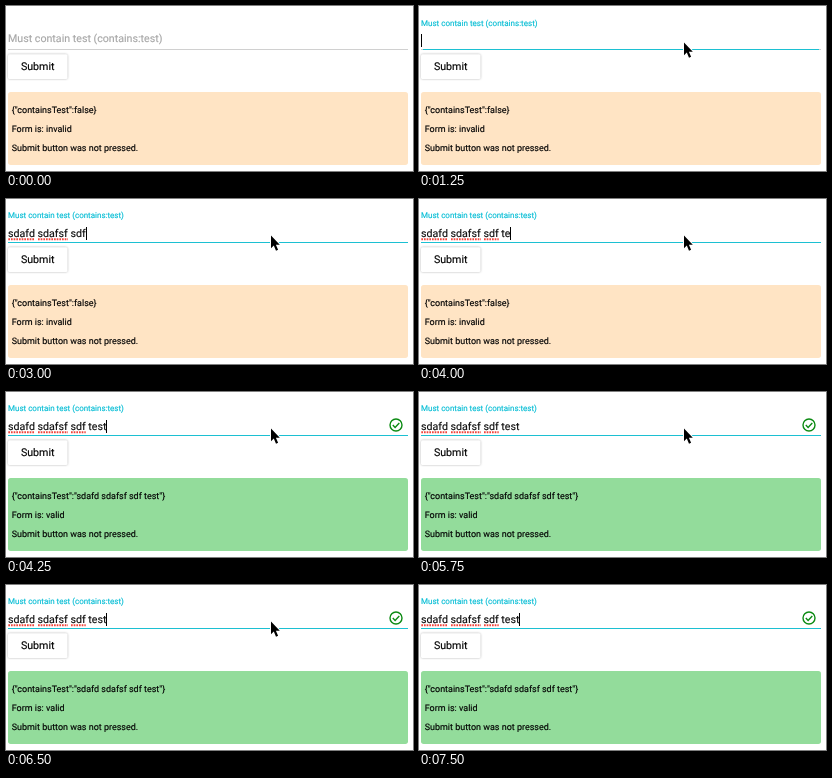
Recreate the animation shown at these times as an HTML page. Size 407 by 165 pixels, loop 7.75 s.

```html
<!DOCTYPE html>
<html lang="en">
<head>
<meta charset="utf-8">
<title>Form validation</title>
<style>
  html, body { margin: 0; width: 100%; height: 100%; overflow: hidden; background: #fff; }
  svg { display: block; width: 407px; height: 165px; font: 10.667px Roboto, sans-serif; }
  text { text-rendering: geometricPrecision; stroke: #000; stroke-width: .15; }
  .output { font-size: 8.98px; }
  .typos { stroke: #f0443c; stroke-width: 1.9; stroke-dasharray: 1.7 .97; }
  .button { fill: #fff; filter: drop-shadow(0 .7px .8px rgba(0, 0, 0, .3)); }
  .valid { fill: none; stroke: #0b8a12; stroke-width: 1.4; }
</style>
</head>
<body>
<svg viewBox="0 0 407 165">
  <rect x="2" y="43" width="400" height="1" fill="#d0d0d0"/>
  <rect id="bar" y="43" height="1" fill="#1cc0d2"/>
  <text id="label" x="2">Must contain test (contains:test)</text>
  <text id="typed" x="2" y="38" fill="#111"></text>
  <g class="typos">
    <path id="typo1" d="M2.3 40.2H29"/>
    <path id="typo2" d="M32 40.2H62"/>
    <path id="typo3" d="M65 40.2H79.7"/>
  </g>
  <rect id="caret" y="28" width="1" height="13"/>
  <g id="check" class="valid">
    <circle cx="390" cy="33" r="6"/>
    <path d="M386.8 33.1l2.3 2.3 4.2-4.4"/>
  </g>

  <rect class="button" x="2" y="48.3" width="59.5" height="24.7" rx="1.5"/>
  <text x="14.9" y="64">Submit</text>

  <rect id="panel" x="2" y="86" width="400" height="73" rx="2.7"/>
  <g class="output">
    <text id="json" x="5.7" y="107"></text>
    <text id="status" x="5.7" y="126"></text>
    <text x="5.7" y="145">Submit button was not pressed.</text>
  </g>

  <path id="pointer" d="M0 0V12.8L2.8 10.1 5 15.3 7.1 14.4 4.9 9.4H8.8Z"
        stroke="#fff" stroke-width="2" paint-order="stroke"/>
</svg>
<script>
  const LOOP = 7750;
  const $ = id => document.getElementById(id);
  const set = (id, attrs) => {
    for (const key in attrs) $(id).setAttribute(key, attrs[key]);
  };
  const show = (id, on) => set(id, { visibility: on ? 'visible' : 'hidden' });
  const mix = (a, b, p) => a + (b - a) * p;

  const FULL = 'sdafd sdafsf sdf test';
  const REST = [166, 166, 166];
  const ACTIVE = [0, 188, 212];

  // Each step: start time and the values that change there.
  const steps = [
    [0, { float: 0, bar: 0, chars: 0, caret: 0, typos: 0, pointer: null }],
    [250, { pointer: [326.6, 14.2] }],
    [500, { pointer: [273.6, 24.2] }],
    [750, { pointer: [265, 36.4] }],
    [1000, { float: .37, bar: 61, caret: 2 }],
    [1250, { float: .98, bar: 198 }],
    [1500, { float: 1, bar: 200, caret: 0 }],
    [2000, { chars: 5, caret: 29 }],
    [2250, { chars: 6, caret: 32, typos: 1 }],
    [2500, { chars: 10, caret: 52 }],
    [2750, { chars: 13, caret: 64, typos: 2 }],
    [3000, { chars: 16, caret: 80 }],
    [3500, { chars: 17, caret: 82, typos: 3 }],
    [4000, { chars: 19, caret: 91 }],
    [4250, { chars: 21, caret: 100 }],
    [4750, { caret: 0 }],
    [5250, { caret: 100 }],
    [5750, { caret: 0 }],
    [6000, { chars: 20, caret: 97 }],
    [6500, { chars: 21, caret: 100 }],
    [6750, { pointer: [267.8, 36.4] }],
    [7000, { caret: 0, pointer: null }],
    [7500, { caret: 100 }]
  ];

  function render(s) {
    const text = FULL.slice(0, s.chars);
    const valid = text.includes('test');
    const color = `rgb(${REST.map((c, i) => Math.round(mix(c, ACTIVE[i], s.float)))})`;

    set('label', {
      y: mix(36, 19.3, s.float),
      'font-size': mix(10.667, 8, s.float),
      fill: color,
      style: `stroke: ${color}`
    });
    set('bar', { x: 202 - s.bar, width: 2 * s.bar });
    set('caret', { x: s.caret });
    show('caret', s.caret);
    for (let i = 1; i <= 3; i++) show('typo' + i, s.typos >= i);
    show('check', valid);
    show('pointer', s.pointer);
    if (s.pointer) set('pointer', { transform: `translate(${s.pointer})` });

    set('panel', { fill: valid ? '#93dc9b' : '#ffe4c4' });
    $('typed').textContent = text;
    $('json').textContent = JSON.stringify({ containsTest: valid && text });
    $('status').textContent = `Form is: ${valid ? 'valid' : 'invalid'}`;
  }

  const start = performance.now();
  let current = -1;

  function tick() {
    const t = (performance.now() - start) % LOOP;
    const count = steps.filter(([at]) => at <= t).length;
    if (count !== current) {
      current = count;
      render(Object.assign({}, ...steps.slice(0, count).map(step => step[1])));
    }
    requestAnimationFrame(tick);
  }
  tick();
</script>
</body>
</html>
```
